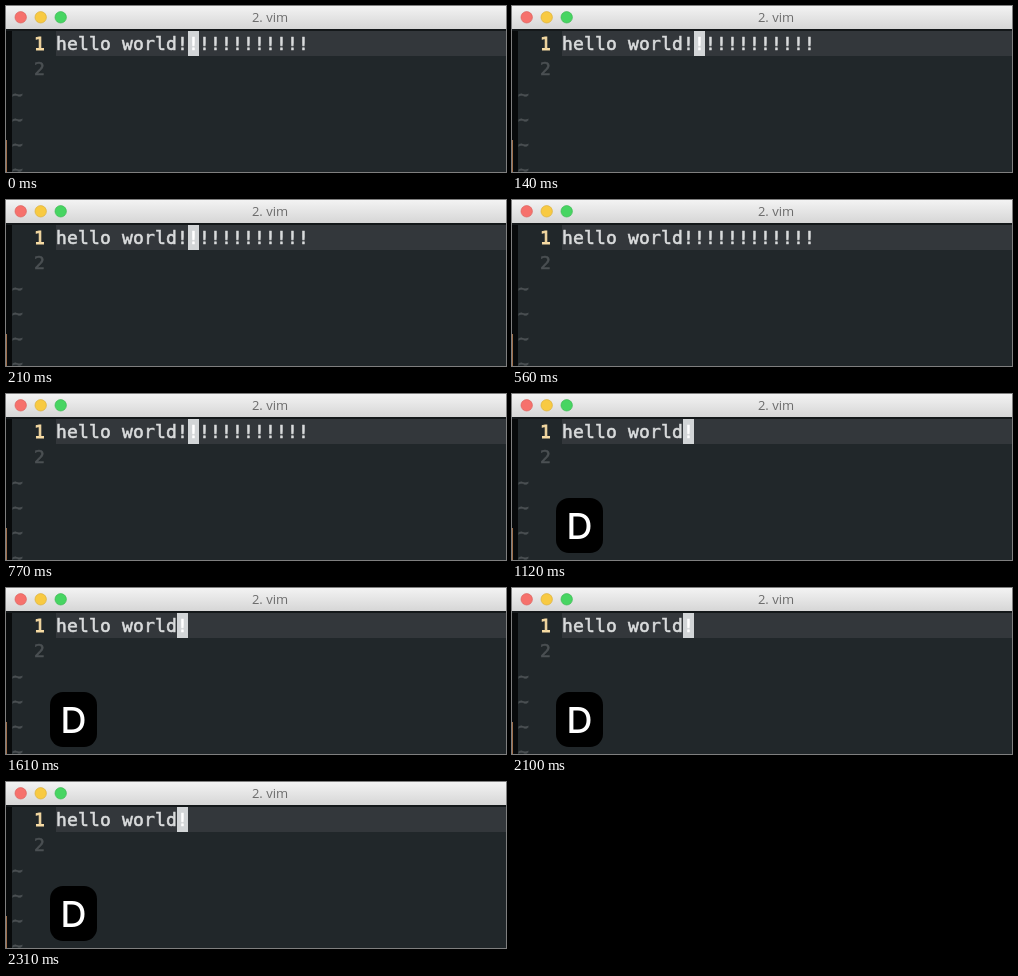
These frames come from a looping animation (500 px wide and 166 px high, 2380 ms). An HTML page:

```html
<!DOCTYPE html>
<html lang="en">
<head>
<meta charset="utf-8">
<title>vim</title>
<style>
  html, body { margin: 0; width: 100%; height: 100%; overflow: hidden; background: #21272a; }
  svg { display: block; width: 500px; height: 166px; }
  .code { font: 18px "DejaVu Sans Mono", monospace; letter-spacing: .163px; white-space: pre; fill: #d9dbdc; stroke: #d9dbdc; stroke-width: .6px; }
  .code .dim { fill: #4b5053; stroke: #4b5053; }
  .code .now { fill: #f8dca4; stroke: #f8dca4; stroke-width: .8px; }
  .code .lit { fill: #fff; stroke: #fff; }
  .title { font: 13px "Open Sans", sans-serif; fill: #6c6c6c; text-anchor: middle; }
  .key { font: 500 36px Inter, sans-serif; fill: #fff; text-anchor: middle; }
</style>
</head>
<body>
<svg viewBox="0 0 500 166">
  <defs>
    <linearGradient id="bar" x2="0" y2="1">
      <stop stop-color="#f3f3f3"/>
      <stop offset="1" stop-color="#d6d6d6"/>
    </linearGradient>
  </defs>
  <rect width="500" height="166" fill="#21272a"/>
  <rect y="23" width="6" height="143" fill="#080a0b"/>
  <rect y="134" width="1" height="32" fill="#a0704c"/>
  <rect x="50" y="25" width="450" height="25" fill="#33373b"/>
  <rect y="23" width="500" height="2" fill="#14181a"/>
  <rect width="500" height="23" fill="url(#bar)"/>
  <g stroke-width=".7">
    <circle cx="14.7" cy="11.3" r="5.7" fill="#f6716c" stroke="#dc625d"/>
    <circle cx="34.7" cy="11.3" r="5.7" fill="#f8ca42" stroke="#dcb03c"/>
    <circle cx="54.7" cy="11.3" r="5.7" fill="#47d562" stroke="#3db953"/>
  </g>
  <text class="title" x="264" y="16">2. vim</text>
  <g class="code">
    <text class="now" x="28" y="44">1</text>
    <text class="dim" x="28" y="68.5">2</text>
    <text class="dim" x="6" y="95">~</text>
    <text class="dim" x="6" y="120">~</text>
    <text class="dim" x="6" y="145">~</text>
    <text class="dim" x="6" y="170">~</text>
    <text x="50" y="44">hello world!</text>
    <text id="tail" x="182" y="44">!!!!!!!!!!!</text>
    <g id="cursor">
      <rect x="182" y="25" width="11" height="25" fill="#d2d5d7" stroke="none"/>
      <text class="lit" x="182" y="44">!</text>
    </g>
  </g>
  <g id="badge">
    <rect x="44" y="104" width="47" height="55" rx="13"/>
    <text class="key" x="67.5" y="145">D</text>
  </g>
</svg>
<script>
  const LOOP = 2380, DELETE = 1120;

  // steps: [time in ms, style], each held until the next
  function play(id, steps) {
    const frames = steps.map(([t, style]) => ({ offset: t / LOOP, easing: "step-end", ...style }));
    frames.push({ ...frames[frames.length - 1], offset: 1 });
    document.getElementById(id).animate(frames, { duration: LOOP, iterations: Infinity })
      .startTime = 0;
  }

  const show = { opacity: 1 }, hide = { opacity: 0 };
  const at = (x, opacity = 1) => ({ transform: `translateX(${x}px)`, opacity });

  play("cursor", [[0, at(0)], [560, at(0, 0)], [770, at(0)], [DELETE, at(-11)]]);
  play("tail", [[0, show], [DELETE, hide]]);
  play("badge", [[0, hide], [DELETE, show]]);
</script>
</body>
</html>
```
